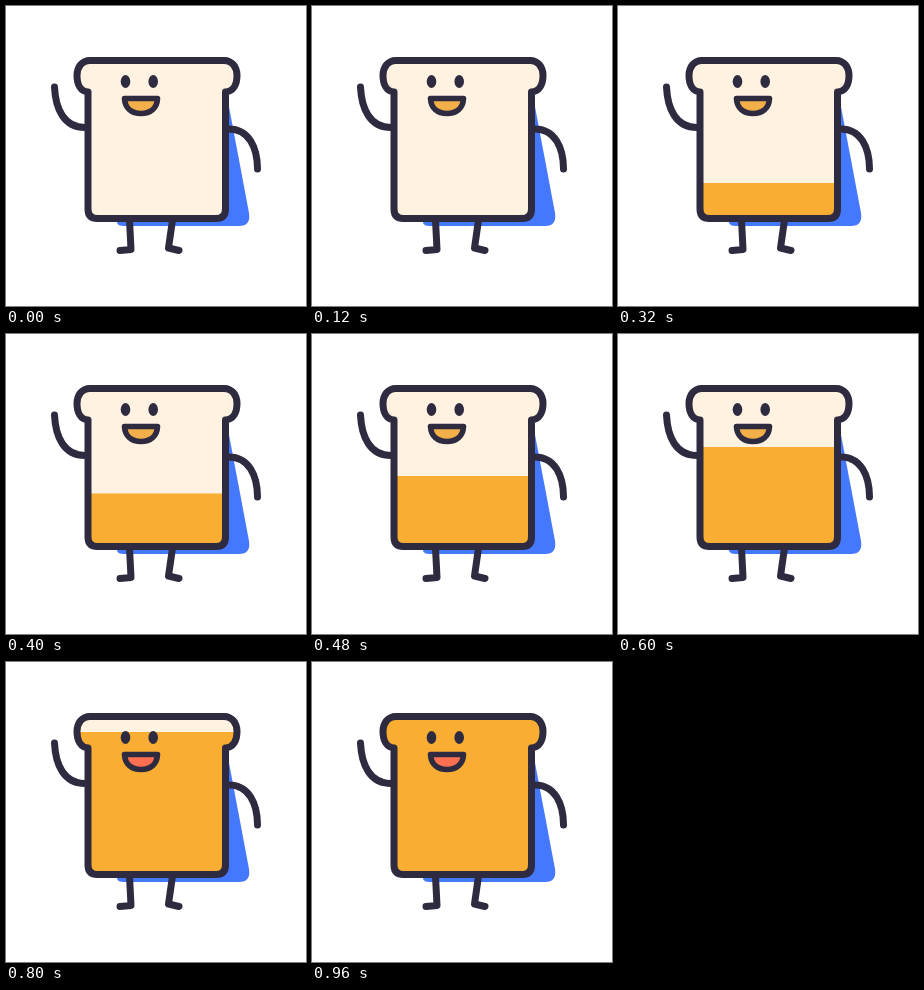
Recreate the animation shown at these times as an HTML page. Size 300 by 300 pixels, loop 1000 ms.

```html
<!DOCTYPE html>
<html lang="en">
<head>
<meta charset="utf-8">
<title>Toast</title>
<style>
  html, body { margin: 0; width: 100%; height: 100%; overflow: hidden; background: #fff; }
  svg { display: block; width: 100%; height: 100%; }
  .line { fill: none; stroke: #2e2b40; stroke-width: 7; stroke-linecap: round; stroke-linejoin: round; }
  .mouth { stroke-width: 5.6; }
  .ink { fill: #2e2b40; }
  #level { animation: rise 1s infinite; }

  /* the toasting line climbs in 40 ms steps */
  @keyframes rise {
    0%   { transform: translateY(244px); animation-timing-function: steps(5); }
    20%  { transform: translateY(202px); animation-timing-function: steps(3); }
    32%  { transform: translateY(177px); animation-timing-function: steps(4); }
    48%  { transform: translateY(142px); animation-timing-function: steps(3); }
    60%  { transform: translateY(113px); animation-timing-function: steps(5); }
    80%  { transform: translateY(70px);  animation-timing-function: steps(5); }
    100% { transform: translateY(26px); }
  }
</style>
</head>
<body>
<svg viewBox="0 0 300 300">
  <defs>
    <path id="bread" d="M84 54.5H218C226 54.5 231 61 231 69.5C231 79 227 85.5 219.5 86V203Q219.5 212.5 210 212.5H91.500Q82 212.500 82 203V86C75 85.500 71 79 71 69.500C71 61 76 54.500 84 54.500Z"/>
    <path id="smile" d="M118.500 92.500H151.500C151 102 144.500 107.500 135 107.500C125.500 107.500 119 102 118.500 92.500Z"/>
    <clipPath id="toasted"><rect id="level" width="300" height="300"/></clipPath>
  </defs>

  <path fill="#4478ff" d="M140 90H221L243 207Q245 220 233 220H117Q109 220 111 211Z"/>

  <g class="line">
    <path d="M48.500 81C49.500 103 58 121.500 79 121.500"/>
    <path d="M222 123C243 122.500 251.500 142 251.500 163"/>
    <path d="M123.500 214L125 243.500L114 244.500"/>
    <path d="M166.500 214L162.500 242L173 244.500"/>
  </g>

  <use href="#bread" fill="#fff2e1"/>
  <use href="#smile" fill="#f3b04a"/>
  <g clip-path="url(#toasted)">
    <use href="#bread" fill="#f9ad33"/>
    <use href="#smile" fill="#ff6f50"/>
  </g>

  <use href="#bread" class="line"/>
  <use href="#smile" class="line mouth"/>
  <g class="ink">
    <ellipse cx="119.500" cy="75.500" rx="4.800" ry="6.500"/>
    <ellipse cx="147.200" cy="75.500" rx="4.800" ry="6.500"/>
  </g>
</svg>
</body>
</html>
```
